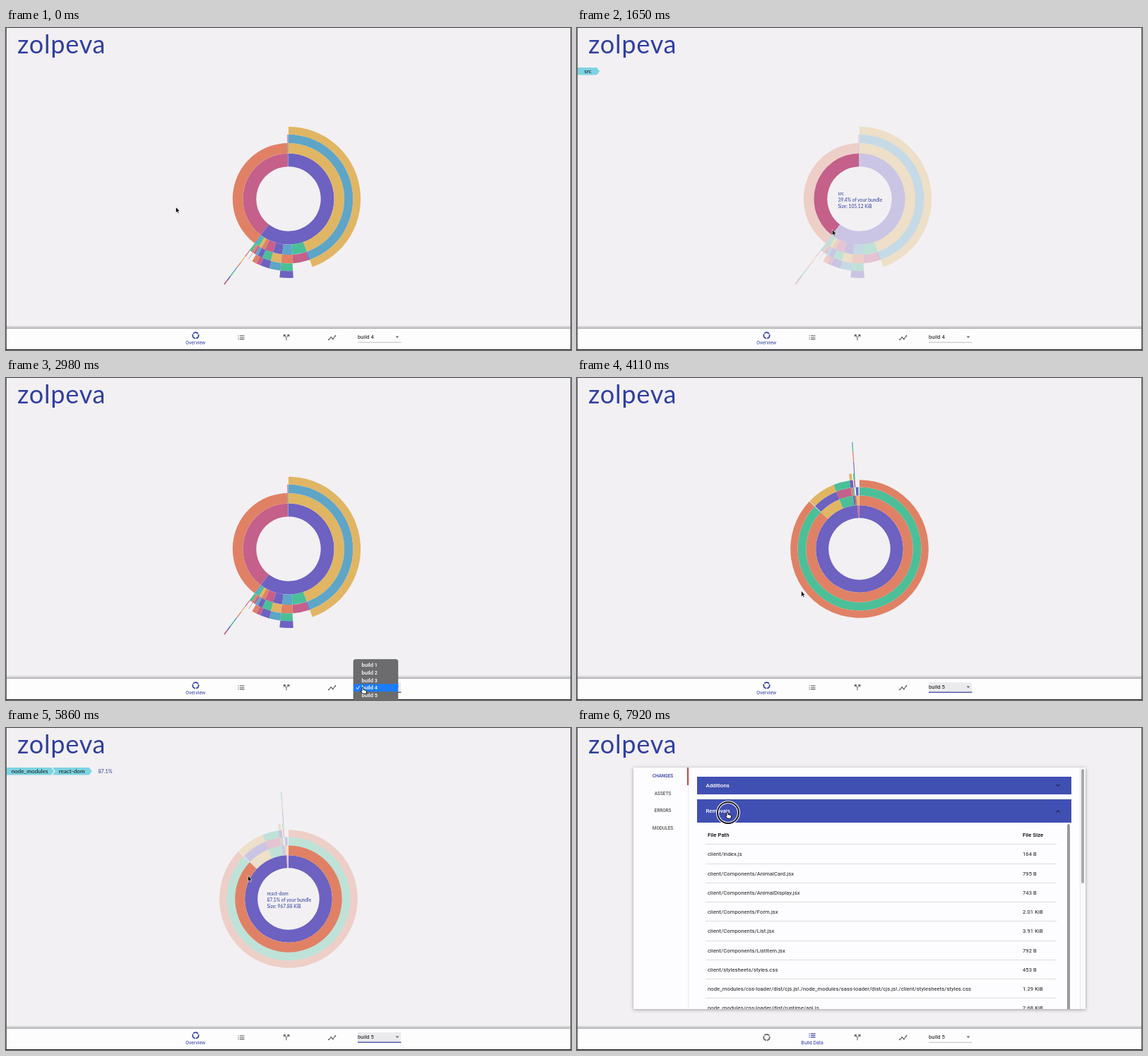
An HTML page that plays this animation: 800 by 456 pixels, repeating every 8 s.

```html
<!DOCTYPE html>
<html lang="en">
<head>
<meta charset="utf-8">
<title>Bundle overview</title>
<style>
  html, body { margin: 0; width: 100%; height: 100%; overflow: hidden; }
  body { background: #f2f0f3; font-family: Roboto, sans-serif; }
  #stage { position: absolute; left: 0; top: 0; width: 800px; height: 456px; overflow: hidden; background: #f2f0f3; }
  #stage > svg { position: absolute; left: 0; top: 0; }
  .lato { font-family: Lato, sans-serif; fill: #303f9f; }
  .mid { text-anchor: middle; }

  #card { position: absolute; left: 80px; top: 56px; width: 640px; height: 342px; overflow: hidden; background: #fdfcfe; }
  #shade { position: absolute; left: 80px; top: 56px; width: 640px; height: 342px; box-shadow: 0 1px 5px rgba(0,0,0,.35); }
  #tabs { position: absolute; top: 0; left: 0; width: 77px; border-right: 1px solid #eee; height: 342px; }
  #tabs div { height: 24.6px; line-height: 24.6px; padding-left: 6px; text-align: center; font-size: 6.4px; font-weight: 500; color: #555; }
  #tabs div:first-child { color: #303f9f; }
  #mark { position: absolute; left: 76.3px; top: 0; width: 1.6px; height: 25px; background: #c0473f; }
  #panels { position: absolute; left: 90px; top: 12.5px; width: 530px; }
  .head { position: relative; display: flex; align-items: center; padding-left: 12.5px; background: #404fb2; color: #fff; font-size: 7.8px; font-weight: 500; }
  .head svg { position: absolute; right: 14px; top: 50%; margin-top: -5px; }
  .body { position: relative; overflow: hidden; background: #fdfcfe; margin-bottom: 7.5px; }
  .row { position: relative; margin-left: 12px; width: 497px; height: 27.25px; line-height: 27.25px; font-size: 7.63px; letter-spacing: .0107em; color: #1c1c1c; box-sizing: border-box; border-bottom: .6px solid #ddd; white-space: nowrap; padding-left: 3px; }
  .row:first-child { height: 31.4px; line-height: 35.5px; font-weight: 500; color: #000; }
  .row span { position: absolute; left: 449px; }
  .bar { position: absolute; background: #a9a9ab; border-radius: 2px; width: 4px; }
  .body .bar { left: 524px; top: 2px; height: 420px; background: #99999b; }
  #track { position: absolute; left: 632px; top: 0; width: 7px; height: 342px; border-left: 1px solid #e4e4e6; background: #fafafa; }
  #thumb { left: 634px; top: 2px; }
</style>
</head>
<body>
<div id="stage">
  <svg width="800" height="456">
    <text class="lato" x="16" y="36.3" font-size="36" letter-spacing=".8">zolpeva</text>
    <g id="bursts"></g>
    <g id="crumbs"></g>
    <g id="info" class="lato" font-size="6.7">
      <text x="369.5" y="237"></text><text x="369.5" y="246"></text><text x="369.5" y="255"></text>
    </g>
  </svg>

  <div id="page">
    <div id="shade"></div>
    <div id="card">
      <div id="tabs"><div>CHANGES</div><div>ASSETS</div><div>ERRORS</div><div>MODULES</div></div>
      <div id="mark"></div>
      <div id="panels"></div>
      <div id="track"></div>
      <div id="thumb" class="bar"></div>
    </div>
  </div>

  <svg width="800" height="456" font-size="7.7">
    <defs>
      <linearGradient id="lift" x1="0" y1="0" x2="0" y2="1">
        <stop offset="0" stop-color="#000" stop-opacity="0"/>
        <stop offset="1" stop-color="#000" stop-opacity=".28"/>
      </linearGradient>
    </defs>
    <rect y="421" width="800" height="5" fill="url(#lift)"/>
    <rect y="426" width="800" height="29" fill="#fefdfe"/>
    <rect id="pressed" x="301" y="426" width="64" height="29" fill="#e2e4f4"/>
    <g id="nav">
      <g>
        <circle cx="268.5" cy="438" r="4.2" fill="none" stroke="currentColor" stroke-width="1.7" stroke-dasharray="7.8 1" stroke-dashoffset="2"/>
        <text class="mid" x="268.3" y="450.7" font-size="6.9" fill="currentColor">Overview</text>
      </g>
      <g>
        <path d="M328.5 435.8h1.2M331 435.8h6.5M328.5 438.2h1.2M331 438.2h6.5M328.5 440.6h1.2M331 440.6h6.5" stroke="currentColor" stroke-width="1.1"/>
        <text class="mid" x="333" y="450.7" font-size="6.9" fill="currentColor">Build Data</text>
      </g>
      <g fill="none" stroke="currentColor" stroke-width="1.1">
        <path d="M394 435l3 3.2v4M400.2 435l-2.2 2.3M393.4 437.3v-2.7h2.7M398.2 434.6h2.7v2.7"/>
      </g>
      <g fill="none" stroke="currentColor" stroke-width="1.1">
        <path d="M457 441.3l3.2-3.2 2.6 2.4 3.6-4.6"/>
        <path d="M457 441.3h.01M460.2 438.1h.01M462.8 440.5h.01M466.4 435.9h.01" stroke-width="2" stroke-linecap="round"/>
      </g>
    </g>
    <rect id="focus" x="498" y="431" width="61" height="14" fill="#ebeaec"/>
    <text id="build" x="498" y="440.2" fill="#111"></text>
    <path d="M551.5 436.5h5l-2.5 2.6z" fill="#666"/>
    <path id="underline" d="M498 445.2h61.5"/>
    <path d="M.5 0V456M799.5 0V456" stroke="#6b6a6e"/>
    <rect y="455" width="800" height="1" fill="#151418"/>

    <g id="menu">
      <rect x="492" y="398.5" width="63" height="64" rx="3" fill="#6c6b6d" stroke="#555" stroke-width=".5"/>
      <rect id="choice" x="492" width="63" height="10.8" fill="#1b7cfb"/>
    </g>
    <g id="status">
      <path d="M0 444.5h57q3 0 3 3v8.5H0z" fill="#3a393c"/>
      <text x="3" y="452" font-size="5.9" fill="#d6d5d8">localhost:1111/build</text>
    </g>
    <g id="ring" fill="none">
      <circle r="15" stroke="#fff" stroke-width="4"/>
      <circle r="15" stroke="#15151c" stroke-width="2"/>
    </g>
    <path id="arrow" d="M0 0V8.2L1.9 6.5 3.2 9.3 4.5 8.7 3.2 6H5.6Z" fill="#000" stroke="#fff" stroke-width=".6"/>
    <path id="hand" d="M-1 .6Q0-.6 1 .6V3.5L4.8 4.4Q5.8 4.8 5.6 6L4.8 9.2H.2L-2.8 5.6Q-2.6 4.4-1 5.3Z" fill="#fff" stroke="#000" stroke-width=".9"/>
  </svg>
</div>

<script>
const LOOP = 8000, BUILD_SWITCH = 3480, PAGE_SWITCH = 6320, LEAVE_FADE = 400;
const CENTER = { x: 400, y: 242 }, RADIUS = 151.5;
const COLORS = { G: '#4bbf98', B: '#5ea5c8', P: '#6d61c1', K: '#c4608a', O: '#e08165', Y: '#e0b664' };
const $ = id => document.getElementById(id);

// Each ring lists "<color><end angle>=<name>"; "-" leaves a gap.
const charts = [
  { depth: 11, total: 266.8, rings: [
    'P217.4=node_modules K359.24=src B360',
    'Y161=react-dom G176=scheduler B186.5=prop-types P196 K205 O209 Y212 G215 B217.4 O359=client K359.6 G360',
    'B160.7=cjs P161.8 K176 O186.8 Y196 G204 P208.5 B211 K213 O215 G217.3 -358.9 K359.7',
    'Y160.7=index.js -176.5 G186.5 B195.5 P203 K206.5 O210.3 -213.3 O213.7',
    '-176.5 P186.5'],
    spike: { from: 216.6, to: 217.25, ring: 4, colors: 'KYOBGPK' } },
  { depth: 12, total: 1111.8, rings: [
    'P357.5=node_modules K359.6=client',
    'O313.4=react-dom Y337.9=react G353=scheduler P355 K356.5 Y359.6',
    'G313.4=cjs -313.9 P338.02=cjs K351.8 O353.7 G355 -356.5 P359',
    'O313.4=index.js -313.9 Y338 G351.7 P354.5 -355.3 K356.3',
    '-351.9 Y354 -355.1 G356.4'],
    spike: { from: 355.85, to: 356.4, ring: 6, colors: 'PPOOGB' } }
];

// Pointer stops: time, x, y
const stops = [
  [0, 240.5, 253.5], [250, 240.5, 253.5], [700, 328, 245], [930, 347, 228], [1180, 412, 158],
  [1380, 405, 185], [1650, 361.5, 285.5], [1850, 384, 315], [2150, 412, 326], [2470, 446, 314],
  [2620, 470, 352], [2830, 505, 438], [3050, 505, 438], [3260, 509, 449], [3480, 509, 449],
  [3780, 400, 390], [3950, 328, 330], [4110, 317.5, 301.5], [4300, 317.5, 301.5], [4600, 338, 272],
  [4950, 346, 215], [5200, 352.5, 181], [5350, 352.5, 181], [5600, 376, 164], [5800, 360, 186],
  [5950, 312, 250], [6220, 342, 439], [6950, 342, 439], [7300, 216, 88], [7450, 216, 88],
  [7660, 213, 119], [8000, 213, 119]
];
const clicks = [7360, 7690], CLICK_TIME = 310;

const clamp = v => Math.max(0, Math.min(1, v));
const smooth = p => p * p * (3 - 2 * p);
const ramp = (t, from, to) => smooth(clamp((t - from) / (to - from)));
const show = (el, on) => { el.style.display = on ? '' : 'none'; };

function svg(tag, attrs, parent, text) {
  const el = document.createElementNS('http://www.w3.org/2000/svg', tag);
  for (const key in attrs) el.setAttribute(key, attrs[key]);
  if (text !== undefined) el.textContent = text;
  parent.appendChild(el);
  return el;
}

function sector(r0, r1, a0, a1) {
  const at = (r, a) => {
    const rad = a * Math.PI / 180;
    return `${(CENTER.x + r * Math.sin(rad)).toFixed(2)} ${(CENTER.y - r * Math.cos(rad)).toFixed(2)}`;
  };
  const large = a1 - a0 > 180 ? 1 : 0;
  return `M${at(r1, a0)}A${r1} ${r1} 0 ${large} 1 ${at(r1, a1)}L${at(r0, a1)}A${r0} ${r0} 0 ${large} 0 ${at(r0, a0)}Z`;
}

function buildChart(chart) {
  chart.group = svg('g', {}, $('bursts'));
  chart.segments = [];
  const radius = k => RADIUS * Math.sqrt(k / chart.depth);
  const add = (ring, from, to, color, name) => {
    const el = svg('path', { d: sector(radius(ring), radius(ring + 1), from, to), fill: COLORS[color] }, chart.group);
    chart.segments.push({ ring, from, to, name, el });
  };
  chart.rings.forEach((list, i) => {
    let from = 0;
    for (const item of list.split(' ')) {
      const [span, name = i > 2 ? 'index.js' : 'lib'] = item.split('=');
      const to = +span.slice(1);
      if (span[0] !== '-') add(i + 1, from, to, span[0], name);
      from = to;
    }
  });
  const { from, to, ring, colors } = chart.spike;
  [...colors].forEach((c, i) => add(ring + i, from, to, c, 'lib'));
}

function pointerAt(t) {
  const i = Math.max(1, stops.findIndex(s => s[0] > t));
  const [t0, x0, y0] = stops[i - 1], [t1, x1, y1] = stops[i];
  const p = ramp(t, t0, t1);
  return { x: x0 + (x1 - x0) * p, y: y0 + (y1 - y0) * p };
}

function hitAt(chart, t) {
  const p = pointerAt(t), dx = p.x - CENTER.x, dy = p.y - CENTER.y;
  const ring = Math.floor((dx * dx + dy * dy) / RADIUS ** 2 * chart.depth);
  const angle = (Math.atan2(dx, -dy) * 180 / Math.PI + 360) % 360;
  return chart.segments.find(s => s.ring === ring && s.from <= angle && angle < s.to);
}

const pathTo = (chart, hit) => {
  const mid = (hit.from + hit.to) / 2;
  return chart.segments.filter(s => s === hit || (s.ring < hit.ring && s.from <= mid && mid < s.to));
};

function drawCrumbs(trail, percent) {
  const g = $('crumbs');
  g.replaceChildren();
  let x = 0;
  trail.forEach(({ name }, i) => {
    const w = 16 + 4 * name.length;
    svg('path', { d: `M${x} 56h${w}l4 5.2-4 5.2h${-w}${i ? 'l4-5.2' : ''}z`, fill: '#7dd3e2' }, g);
    svg('text', { x: x + w / 2 + 1.5, y: 64, class: 'lato mid', 'font-size': 8.2, style: 'fill:#111' }, g, name);
    x += w + 1.7;
  });
  if (trail.length > 1) svg('text', { x: x + 11, y: 63.9, class: 'lato', 'font-size': 7.3 }, g, percent);
}

let lastHit;
function drawChart(t) {
  const index = t < BUILD_SWITCH ? 0 : 1, chart = charts[index];
  charts.forEach((c, i) => show(c.group, i === index));
  const hit = hitAt(chart, t);
  let shown = hit, fade = 1;
  const earliest = Math.max(index ? BUILD_SWITCH : 0, t - LEAVE_FADE);
  for (let past = t - 20; !shown && past > earliest; past -= 20) {
    shown = hitAt(chart, past);
    fade = 1 - (t - past) / LEAVE_FADE;
  }
  const trail = shown ? pathTo(chart, shown) : [];
  for (const s of chart.segments) s.el.style.opacity = !shown || trail.includes(s) ? 1 : 1 - .7 * fade;
  if (hit === lastHit) return;
  lastHit = hit;
  show($('info'), hit);
  show($('crumbs'), hit);
  if (!hit) return;
  const share = (hit.to - hit.from) / 360;
  const percent = (share * 100).toPrecision(3) + '%';
  [hit.name, `${percent} of your bundle`, `Size: ${(share * chart.total).toFixed(2)} KiB`]
    .forEach((line, i) => { $('info').children[i].textContent = line; });
  drawCrumbs(trail, percent);
}

const files = [
  ['File Path', 'File Size'],
  ['client/index.js', '164 B'],
  ['client/Components/AnimalCard.jsx', '795 B'],
  ['client/Components/AnimalDisplay.jsx', '743 B'],
  ['client/Components/Form.jsx', '2.01 KiB'],
  ['client/Components/List.jsx', '3.91 KiB'],
  ['client/Components/ListItem.jsx', '792 B'],
  ['client/stylesheets/styles.css', '453 B'],
  ['node_modules/css-loader/dist/cjs.js!./node_modules/sass-loader/dist/cjs.js!./client/stylesheets/styles.css', '1.29 KiB'],
  ['node_modules/css-loader/dist/runtime/api.js', '2.68 KiB'],
  ['node_modules/object-assign/index.js', '2.11 KiB']
];
const rows = files.map(([path, size]) => `<div class="row">${path}<span>${size}</span></div>`).join('');
$('panels').innerHTML = ['Additions', 'Removals'].map(title =>
  `<div class="head">${title}<svg width="10" height="10"><path d="M2.3 3.7L5 6.3 7.7 3.7" fill="none" stroke="#1d2452" stroke-width="1.1"/></svg></div>
   <div class="body">${rows}<div class="bar"></div></div>`).join('');
const heads = document.querySelectorAll('.head'), bodies = document.querySelectorAll('.body');

function drawPage(t) {
  const open = [1 - ramp(t, 7400, 7620), ramp(t, 7700, 7900)];
  open.forEach((o, i) => {
    heads[i].style.height = 25 + 8 * o + 'px';
    heads[i].querySelector('svg').style.transform = `rotate(${180 * o}deg)`;
    bodies[i].style.height = 331 * o + 'px';
  });
  $('thumb').style.height = 84 + 78 * (1 - open[0]) + 'px';
}

function drawNav(t, p) {
  const active = t < PAGE_SWITCH ? 0 : 1;
  [...$('nav').children].forEach((item, i) => {
    item.style.color = i === active ? '#303f9f' : '#626166';
    item.setAttribute('transform', `translate(0 ${i === active ? -2.7 : 0})`);
    const label = item.querySelector('text');
    if (label) show(label, i === active);
  });
  show($('pressed'), p.y > 426 && p.x > 301 && p.x < 365);
  const focused = t > 2870 && t < PAGE_SWITCH;
  show($('focus'), focused);
  $('build').textContent = t < BUILD_SWITCH ? 'build 4' : 'build 5';
  $('underline').setAttribute('stroke', focused ? '#303f9f' : '#8d8c90');
  $('underline').setAttribute('stroke-width', focused ? 1.2 : .6);
  show($('menu'), t > 2870 && t < BUILD_SWITCH);
  $('choice').setAttribute('y', 400.9 + 10.8 * Math.max(0, Math.min(4, Math.floor((p.y - 400.9) / 10.8))));
  show($('status'), t > 6180 && t < 7540);
}

function drawPointer(t, p) {
  const onNav = p.y > 426 && p.x > 236 && p.x < 560;
  const onHead = t > PAGE_SWITCH && p.x > 170 && p.x < 700 && p.y > 68 && p.y < 134;
  show($('hand'), onNav || onHead);
  show($('arrow'), !(onNav || onHead));
  for (const id of ['hand', 'arrow']) $(id).setAttribute('transform', `translate(${p.x} ${p.y})`);
  show($('ring'), clicks.some(c => t >= c && t < c + CLICK_TIME));
  $('ring').setAttribute('transform', `translate(${p.x + 1} ${p.y + 1})`);
}

function render(t) {
  const p = pointerAt(t), overview = t < PAGE_SWITCH;
  show($('bursts'), overview);
  show($('page'), !overview);
  if (overview) drawChart(t);
  else {
    show($('info'), false);
    show($('crumbs'), false);
    lastHit = null;
    drawPage(t);
  }
  drawNav(t, p);
  drawPointer(t, p);
}

charts.forEach(buildChart);
for (let i = 0; i < 5; i++) {
  svg('text', { x: 503.5, y: 409 + 10.8 * i, fill: '#fff', 'font-weight': 500, 'font-size': 7.5 }, $('menu'), 'build ' + (i + 1));
}
svg('path', { d: 'M496 438.5l1.7 2.2 3-4.6', fill: 'none', stroke: '#fff', 'stroke-width': 1 }, $('menu'));

const start = performance.now();
(function frame() {
  render((performance.now() - start) % LOOP);
  requestAnimationFrame(frame);
})();
</script>
</body>
</html>
```
